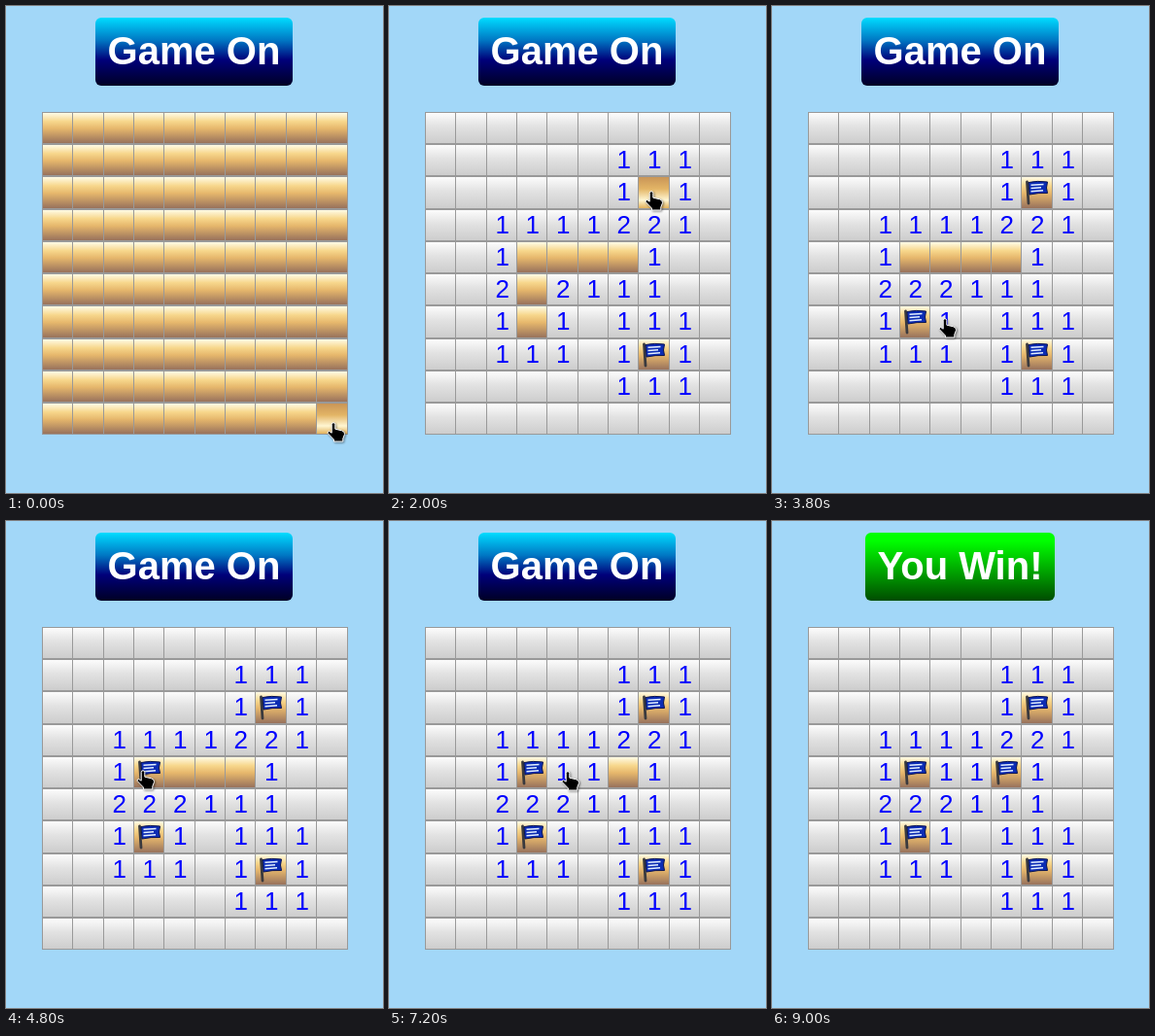
An HTML page that plays this animation: 388 px wide and 501 px high, repeating every 9500 ms.

```html
<!DOCTYPE html>
<html lang="en">
<head>
<meta charset="utf-8">
<title>Minesweeper</title>
<style>
  html, body { margin: 0; width: 100%; height: 100%; overflow: hidden; background: #a2d7f8; }
  body { position: relative; font-family: "Liberation Sans", Arial, sans-serif; }
  #title {
    position: absolute; top: 12px; left: 92px; width: 203px; height: 70px; border-radius: 6px;
    font: bold 40px/69px "Liberation Sans", Arial, sans-serif; color: #fff; text-align: center; white-space: nowrap;
    background: linear-gradient(#00dcff, #0078c4 33%, #00007a 62%, #000024);
  }
  #title.won { left: 96px; width: 195px; background: linear-gradient(#0f0 12%, #004c00); }
  #board { position: absolute; left: 37px; top: 109px; width: 315px; height: 332px; background: #999; }
  .cell { position: absolute; font-size: 26px; line-height: 31px; text-align: center; text-indent: 1.5px; color: #00f; }
  .cell svg { display: none; position: absolute; left: 0; top: 0; }
  .open { background: linear-gradient(#fcfcfc, #e2e2e2 45%, #cdcdcd); }
  .gold, .flag { background: linear-gradient(#fffbe6, #f7d78c 28%, #e6b76c 52%, #98725c); }
  .hover { background: linear-gradient(#c99557, #e3b566 38%, #fff6d2 74%, #e2b25c); }
  .press { background: linear-gradient(#98725c, #e6b76c 55%, #f7d78c); }
  .flag svg { display: block; }
  #hand { position: absolute; left: 0; top: 0; overflow: visible; filter: drop-shadow(1px 1px 1px #0007); }
</style>
</head>
<body>
<div id="title"></div>
<div id="board"></div>
<svg id="hand" width="20" height="22">
  <path d="M5.2 2.6Q5.2.7 7 .7T8.8 2.6V7.2L15.6 8.8Q18.9 9.7 18.5 12.6L16.8 17V20H7.4V18L1.2 11.6Q.6 9.6 2.6 9.5L5.2 11.2Z"
    stroke="#fff" stroke-linejoin="round"/>
</svg>
<script>
const LOOP = 9500, STEP = 100, HOLD = 200, SIZE = 10;
const MINES = "2,7 4,3 4,6 6,3 7,7".split(" ");
const colX = col => 37.151 + 31.335 * col;
const rowY = row => 109 + 33.22 * row;

const flagSvg = `<svg width="30" height="31">
  <path d="M5.500 5L7 27" stroke="#3a3a3e" stroke-width="2.800" stroke-linecap="round"/>
  <path d="M7 5.500Q16 3.500 26.500 5L25.500 11L26.500 16.500Q17 16 8 18Z" fill="#0c2cb4" stroke="#0a1450"/>
  <path d="M9.500 8.300L22.500 7.500M9.500 11.500L20 10.800M9.500 14.700L22 13.800" stroke="#e4f0ff" stroke-width="1.500"/>
</svg>`;

const titleEl = document.getElementById("title");
const board = document.getElementById("board");
const hand = document.getElementById("hand");

const cells = Array.from({ length: SIZE * SIZE }, (_, i) => {
  const row = Math.floor(i / SIZE), col = i % SIZE;
  return { row, col, mine: MINES.includes(row + "," + col), openAt: Infinity, flagAt: Infinity, pressAt: Infinity };
});

const near = cell => cells.filter(other =>
  Math.abs(other.row - cell.row) < 2 && Math.abs(other.col - cell.col) < 2);

for (const cell of cells) {
  cell.count = near(cell).filter(other => other.mine).length;
  const left = Math.round(colX(cell.col)) + 1, right = Math.round(colX(cell.col + 1));
  const top = Math.round(rowY(cell.row)) + 1, bottom = Math.round(rowY(cell.row + 1)) - 1;
  cell.el = document.createElement("div");
  cell.el.style.cssText = `left:${left - 37}px;top:${top - 109}px;width:${right - left}px;height:${bottom - top}px`;
  cell.el.innerHTML = flagSvg + "<span></span>";
  cell.label = cell.el.querySelector("span");
  board.append(cell.el);
}

// The pointer lives in board units: whole numbers are cell edges.
const start = { row: 9.63, col: 9.57 };
const glides = [];
let pointer = start;

function glide(first, last, row, col, bow = 0) {
  glides.push({ first, last, from: pointer, row, col, bow });
  pointer = { row, col };
}

const cellAt = ({ row, col }) =>
  cells.find(cell => cell.row === Math.floor(row) && cell.col === Math.floor(col));

function flag(time) {
  cellAt(pointer).flagAt = time;
}

function open(cell, time) {
  if (cell.mine || cell.openAt <= time) return;
  cell.openAt = time;
  if (!cell.count) near(cell).forEach(other => open(other, time));
}

// Digging on an opened number opens its safe neighbours.
function dig(time) {
  const target = cellAt(pointer);
  const group = target.openAt < time ? near(target) : [target];
  for (const cell of group.filter(c => !c.mine && c.openAt > time)) {
    cell.pressAt = time - HOLD;
    open(cell, time);
  }
}

dig(600);
glide(900, 1100, 7.97, 7.5);
flag(1400);
glide(1600, 2000, 2.47, 7.43, 0.5);
flag(2100);
glide(2300, 2700, 6.71, 3.67);
flag(2800);
glide(3000, 3300, 6.41, 4.5);
dig(3800);
glide(4000, 4300, 5.84, 3.63);
glide(4500, 4700, 4.46, 3.31);
flag(4800);
glide(5000, 5100, 5.42, 3.44);
dig(5600);
glide(5800, 6500, 4.6, 4.27, 1.18);
glide(6800, 6900, 4.49, 4.69);
dig(7200);
glide(7600, 8000, 7.37, 6.44, 0.45);
glide(8300, 9000, -4, -1.7);

const winAt = STEP + Math.max(...cells.filter(c => !c.mine).map(c => c.openAt));
for (const cell of cells) if (cell.mine) cell.flagAt = Math.min(cell.flagAt, winAt);

function pointerAt(time) {
  const move = glides.filter(g => g.first <= time).pop();
  if (!move) return start;
  const { first, last, from, row, col, bow } = move;
  const p = Math.min(1, (time - first + STEP) / (last - first + STEP));
  return {
    row: from.row + (row - from.row) * p,
    col: from.col + (col - from.col) * p + bow * Math.sin(Math.PI * p)
  };
}

function stateOf(cell, time, hovered) {
  if (time >= cell.openAt) return "open";
  if (time >= cell.flagAt) return "flag";
  if (time >= cell.pressAt) return "press";
  return cell === hovered ? "hover" : "gold";
}

function render(now) {
  const time = Math.floor(now % LOOP / STEP) * STEP;
  const won = time >= winAt;
  const tip = pointerAt(time), hovered = cellAt(tip);
  titleEl.className = won ? "won" : "";
  titleEl.textContent = won ? "You Win!" : "Game On";
  for (const cell of cells) {
    const state = stateOf(cell, time, hovered);
    cell.el.className = "cell " + state;
    cell.label.textContent = state === "open" && cell.count ? cell.count : "";
  }
  hand.style.transform = `translate(${Math.round(colX(tip.col) - 7)}px, ${Math.round(rowY(tip.row) - 1)}px)`;
}

const began = performance.now();
function tick() {
  render(performance.now() - began);
  requestAnimationFrame(tick);
}
tick();
</script>
</body>
</html>
```
